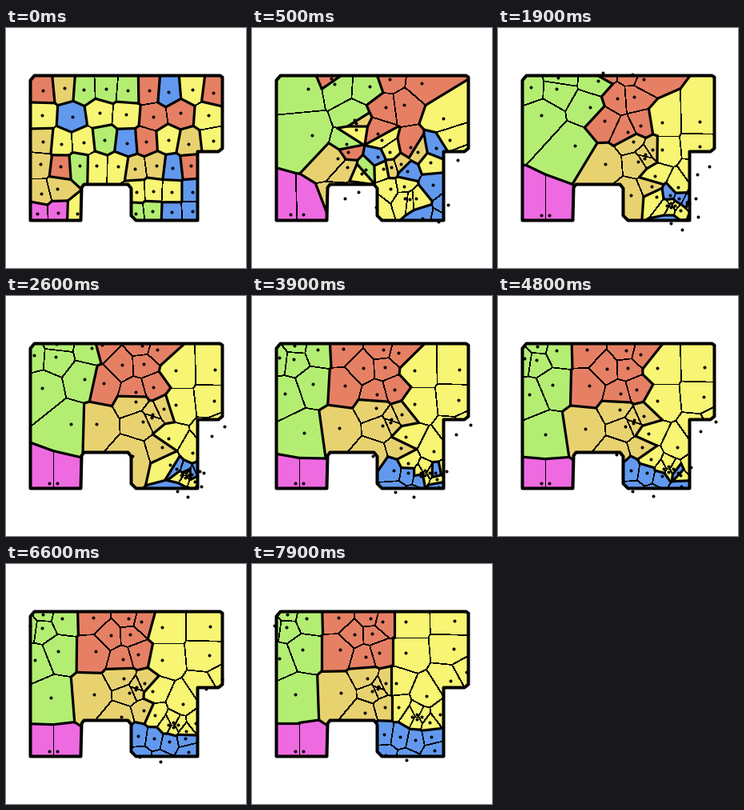
A matplotlib script that plays this animation: 300x300 px, repeating every 8 s.

```python
import numpy as np
import matplotlib.pyplot as plt
from matplotlib.animation import FuncAnimation
from matplotlib.collections import LineCollection, PolyCollection
from matplotlib.patches import Polygon

SIZE, FRAMES, STEP = 300, 80, 100
PX = 0.72  # points per pixel at 100 dpi

COLORS = {'G': '#b3ee73', 'R': '#e68064', 'Y': '#f7f573',
          'T': '#e8d270', 'B': '#6299ee', 'P': '#ee6ae0'}

OUTLINE = np.array([(35, 59), (267, 59), (270, 61), (270, 150), (265, 154), (239, 154),
                    (239, 240), (162, 240), (156, 234), (156, 200), (152, 195),
                    (97, 195), (94, 199), (93, 240), (30, 240), (30, 65)]) + 0.5

# Opening mosaic: y, right end of the row, evenly spaced room letters.
ROWS = [(78, 270, 'RTGGGRBYR'), (108, 270, 'YBYYRRY'), (142, 270, 'TYYGBRYTY'),
        (173, 245, 'TRGYYTTBR'), (204, 245, 'TT...YYYB'), (231, 245, 'PPY..GGBB')]


def ring(x, y, rx, ry, n):
    a = 2 * np.pi * np.arange(n) / n
    return list(zip(x + rx * np.cos(a), y + ry * np.sin(a)))


# Where the seeds of each room come to rest.
REST = {
    'P': [(54, 234), (64, 234)],
    'G': [(28, 77), (44, 63), (68, 68), (63, 107), (34, 118), (43, 79), (54, 163)],
    'R': [(108, 67), (148, 68), (163, 72), (128, 88), (150, 87), (110, 107),
          (142, 116), (159, 111)],
    'T': [(144, 143), (111, 161), (167, 149), (150, 159), (157, 156), (158, 153),
          (141, 186), (166, 179)],
    'B': [(224, 216), (165, 213), (185, 216), (204, 220), (228, 233), (167, 239),
          (193, 245)],
    'Y': [(253, 71), (192, 72), (192, 111), (180, 149), (252, 106), (183, 179),
          (218, 165), (248, 146), (268, 135), (222, 198), (235, 188)]
         + ring(206, 190.5, 6, 3, 4),
}

# Each room passes these poses on its way: centre x, y and stretch x, y.
TIMES = [1200, 2600, 4300, 7900]
POSES = {
    'P': [],
    'G': [(95, 88, 2.4, 0.7), (70, 93, 1.8, 1.0), (54, 100, 1.0, 1.12)],
    'R': [(160, 92, 0.6, 1.8), (158, 88, 1.25, 1.2), (150, 93, 1.25, 1.15)],
    'T': [(179, 180, 0.6, 1.5), (170, 160, 1.5, 1.6), (160, 166, 1.35, 1.35)],
    'B': [(235, 223, 0.6, 1.6), (228, 230, 0.5, 1.1), (196, 232, 1.0, 1.0)],
    'Y': [(222, 183, 0.75, 0.65), (238, 162, 0.8, 1.1), (231, 160, 0.95, 1.08)],
}


def mosaic():
    """Starting points per room, in reading order."""
    rng = np.random.default_rng(4)
    start = {room: [] for room in COLORS}
    for y, right, row in ROWS:
        gap = (right - 30) / len(row)
        for k, room in enumerate(row):
            if room in start:
                start[room].append(np.array([30 + gap * (k + 0.5), y])
                                   + rng.uniform(-3, 3, 2))
    return start


START = mosaic()
ROOM = [room for room in COLORS for _ in REST[room]]


def room_points(room, t):
    rest = np.array(REST[room], float)
    mid = (rest.min(0) + rest.max(0)) / 2 if room == 'Y' else rest.mean(0)
    final = (*mid, 1, 1)
    poses = (POSES[room] or [final] * 3) + [final]
    cx, cy, sx, sy = (np.interp(t, TIMES, part) for part in zip(*poses))
    pts = (rest - mid) * (sx, sy) + (cx, cy)
    if t < TIMES[0]:
        ease = 1 - (1 - t / TIMES[0]) ** 1.5
        pts = START[room] + (pts - START[room]) * ease
    return pts


def cut(cell, nx, ny, c, tag):
    """Keep the part with nx*x + ny*y <= c; each vertex tags its next edge."""
    out = []
    for k, (x, y, edge) in enumerate(cell):
        x2, y2, _ = cell[(k + 1) % len(cell)]
        a, b = nx * x + ny * y - c, nx * x2 + ny * y2 - c
        if a <= 0:
            out.append((x, y, edge))
        if (a <= 0) != (b <= 0):
            f = a / (a - b)
            out.append((x + f * (x2 - x), y + f * (y2 - y), tag if a <= 0 else edge))
    return out


def voronoi(pts):
    cells = []
    for i, (px, py) in enumerate(pts):
        cell = [(0, 0, -1), (SIZE, 0, -1), (SIZE, SIZE, -1), (0, SIZE, -1)]
        dist = np.hypot(*(pts - pts[i]).T)
        for j in np.argsort(dist):
            if j == i or dist[j] < 1e-6:
                continue
            reach = max(((x - px) ** 2 + (y - py) ** 2 for x, y, _ in cell), default=0)
            if dist[j] ** 2 > 4 * reach:
                break
            qx, qy = pts[j]
            c = (qx * qx + qy * qy - px * px - py * py) / 2
            cell = cut(cell, qx - px, qy - py, c, int(j))
        cells.append(cell)
    return cells


fig = plt.figure(figsize=(3, 3), dpi=100, facecolor='white')
ax = fig.add_axes([0, 0, 1, 1])
ax.set(xlim=(0, SIZE), ylim=(SIZE, 0))
ax.axis('off')

wall = Polygon(OUTLINE, fill=False, ec='black', lw=4 * PX, joinstyle='round', zorder=4)
ax.add_patch(wall)
fills = PolyCollection([], edgecolors='none', antialiaseds=False, zorder=1)
thin = LineCollection([], colors='black', linewidths=0.7 * PX, antialiaseds=False, zorder=2)
thick = LineCollection([], colors='black', linewidths=3.2 * PX, capstyle='round', zorder=3)
for layer in (fills, thin, thick):
    ax.add_collection(layer, autolim=False)
    layer.set_clip_path(wall)
dots, = ax.plot([], [], 'o', color='black', ms=4 * PX, mew=0, zorder=5)


def draw(n):
    pts = np.vstack([room_points(room, n * STEP) for room in COLORS])
    polys, tints, inner, border = [], [], [], []
    for i, cell in enumerate(voronoi(pts)):
        if len(cell) < 3:
            continue
        polys.append([(x, y) for x, y, _ in cell])
        tints.append(COLORS[ROOM[i]])
        for k, (x, y, j) in enumerate(cell):
            if j > i:
                end = cell[(k + 1) % len(cell)][:2]
                group = inner if ROOM[i] == ROOM[j] else border
                group.append([(x, y), end])
    fills.set_verts(polys)
    fills.set_facecolor(tints)
    thin.set_segments(inner)
    thick.set_segments(border)
    dots.set_data(pts[:, 0], pts[:, 1])
    return fills, thin, thick, dots


anim = FuncAnimation(fig, draw, frames=FRAMES, interval=STEP, repeat=True,
                     repeat_delay=0, blit=False)
plt.show()
```
